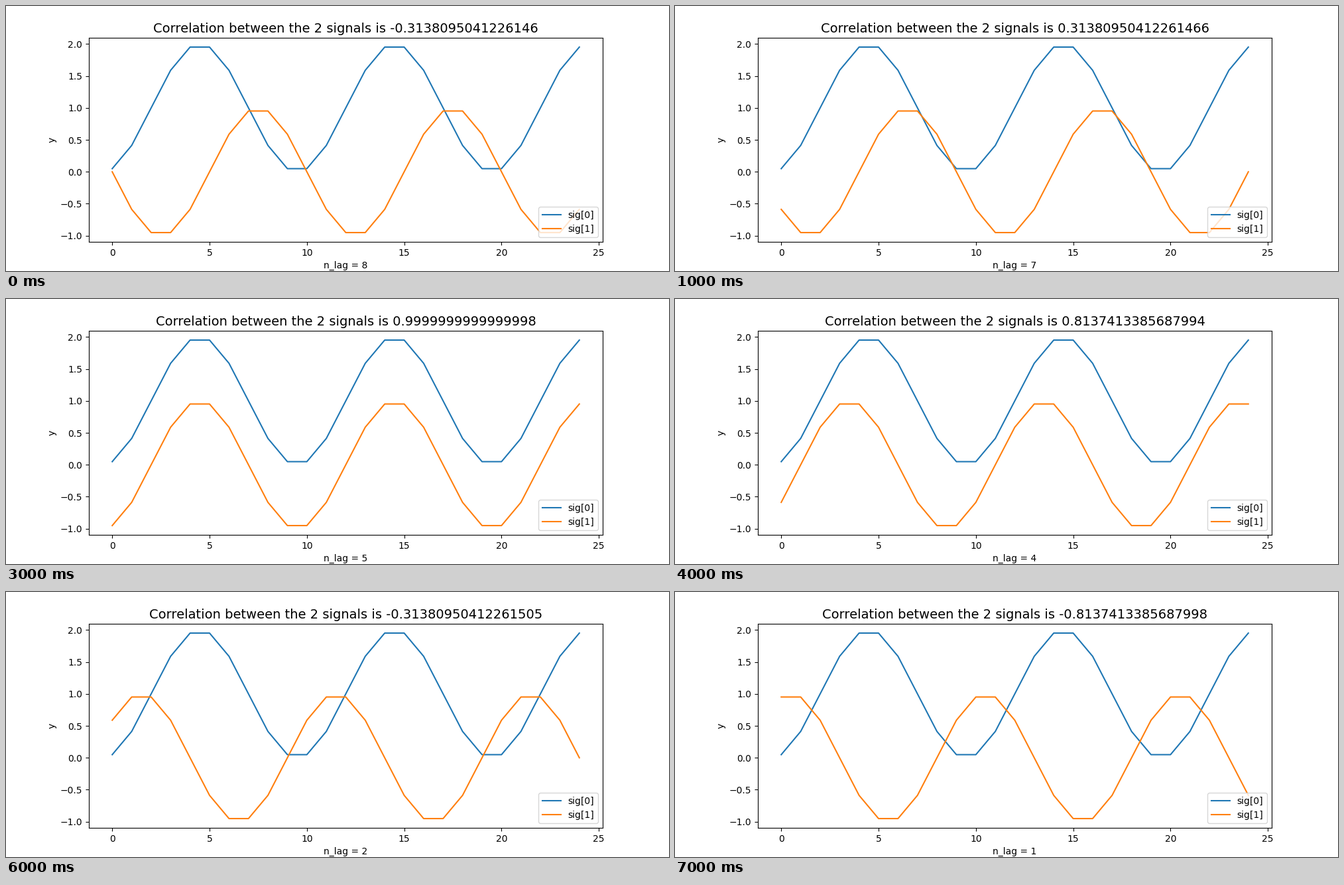
Recreate the animation shown at these times as a matplotlib script. Size 1000 by 400 pixels, loop 8000 ms.

```python
import matplotlib.pyplot as plt
import numpy as np
from matplotlib.animation import FuncAnimation

PERIOD = 10
N = np.arange(25)

# Pearson coefficients at full float precision, indexed by lag.
CORRELATION = {
    8: "-0.3138095041226146",
    7: "0.31380950412261466",
    6: "0.8137413385687998",
    5: "0.9999999999999998",
    4: "0.8137413385687994",
    3: "0.31380950412261466",
    2: "-0.31380950412261505",
    1: "-0.8137413385687998",
}
LAGS = list(CORRELATION)


def wave(shift):
    return np.sin(2 * np.pi * (N + shift) / PERIOD)


plt.rcParams["font.family"] = "DejaVu Sans"
fig, ax = plt.subplots(figsize=(10, 4), dpi=100)
ax.plot(N, 1 + wave(-2), label="sig[0]")
lagged, = ax.plot(N, wave(3 - LAGS[0]), label="sig[1]")
peak = np.sin(0.4 * np.pi)
margin = 0.05 * (1 + 2 * peak)
ax.set_xlim(-1.2, 25.2)
ax.set_ylim(-peak - margin, 1 + peak + margin)
ax.set_ylabel("y")
ax.legend(loc="lower right")
title = ax.set_title("", fontsize=14)


def update(frame):
    lag = LAGS[frame]
    lagged.set_ydata(wave(3 - lag))
    title.set_text(f"Correlation between the 2 signals is {CORRELATION[lag]}")
    ax.set_xlabel(f"n_lag = {lag}")
    return lagged, title


anim = FuncAnimation(fig, update, frames=len(LAGS), interval=1000, repeat=True)
plt.show()
```
